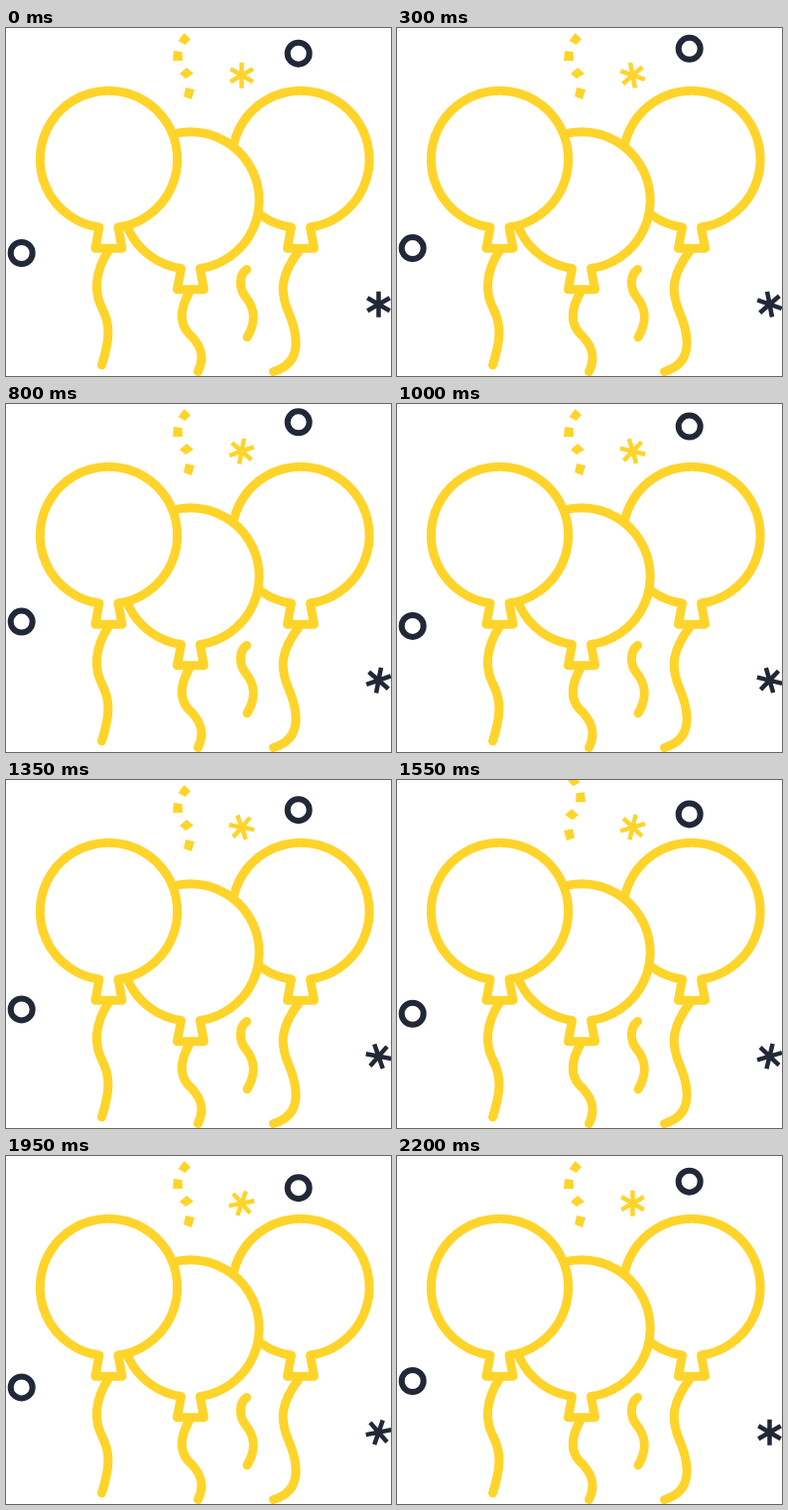
Write an HTML page that moves like this. It is 388 by 351 pixels and loops after 2.25 s.

```html
<!DOCTYPE html>
<html lang="en">
<head>
<meta charset="utf-8">
<title>Party balloons</title>
<style>
  html, body { margin: 0; width: 100%; height: 100%; overflow: hidden; background: #fff; }
  svg { display: block; width: 388px; height: 351px; }
  .yellow { stroke: #ffd42a; }
  .dark { stroke: #222837; }
  .line { fill: none; stroke-width: 9; stroke-linecap: round; stroke-linejoin: round; }
  .balloon { fill: #fff; }
  .ring { fill: none; stroke-width: 6; }
  .star { fill: none; stroke-width: 4.5; }
</style>
</head>
<body>
<svg viewBox="0 0 388 351">
  <defs>
    <path id="balloon" d="M-9.5 68.5A69.2 69.2 0 1 1 9.5 68.5L13.5 89.7H-13.5Z"/>
    <path id="star" d="M0-13V13M-11.26-6.5L11.26 6.5M-11.26 6.5L11.26-6.5"/>
  </defs>

  <g class="line yellow">
    <path d="M103 225C90 245 88 266 97 283C105 299 105 313 96.500 340"/>
    <path d="M185 266C176 282 174 297 184 308C194 317 202 329 193.500 346.500"/>
    <path d="M295 225C277 249 276 265 284 285C294 308 300 338 269.500 346.500"/>
    <path d="M242.500 243.500C235 249 234 262 242 272C251 283 252 297 243 312"/>
    <use class="balloon" href="#balloon" x="297" y="132.500"/>
    <use class="balloon" href="#balloon" x="186" y="174"/>
    <use class="balloon" href="#balloon" x="103.500" y="132.500"/>
  </g>

  <path id="confetti" fill="#ffd42a" d="M179.500 5L186 11L180.500 17L173.500 13ZM169 23L177.500 24L178 33L168 33ZM182 40L189 46L181 51L175 46ZM181 60L190 62L187 72L179 69Z"/>

  <g id="rings" class="ring dark">
    <circle cx="15.700" cy="227" r="11"/>
    <circle cx="294.700" cy="25.700" r="11"/>
  </g>

  <g transform="translate(237.500 47.700)"><use class="star yellow spin" href="#star"/></g>
  <g transform="translate(375.500 278.700)"><use class="star dark spin" href="#star"/></g>
</svg>
<script>
  const LOOP = 2250, STEP = 50, CYCLE = 2200;
  const BOB = [[0, 0], [650, -10.6], [1720, 12.4], [CYCLE, 0]];
  const rings = document.getElementById('rings');
  const confetti = document.getElementById('confetti');
  const stars = document.querySelectorAll('.spin');

  function track(keys, t) {
    const i = Math.max(1, keys.findIndex(([time]) => t <= time));
    const [t0, v0] = keys[i - 1], [t1, v1] = keys[i];
    return v0 + (v1 - v0) * (t - t0) / (t1 - t0);
  }

  function draw(t) {
    rings.setAttribute('transform', `translate(0 ${track(BOB, t)})`);
    stars.forEach(star => star.setAttribute('transform', `rotate(${360 * t / CYCLE})`));

    // The confetti flips to its mirrored pose twice per cycle.
    const phase = t % (CYCLE / 2);
    const flipped = phase >= 400 && phase < 750;
    confetti.setAttribute('transform', flipped ? 'translate(358 -10.7) scale(-1 1)' : '');
  }

  const start = performance.now();
  function tick() {
    const elapsed = (performance.now() - start) % LOOP;
    draw(Math.floor(elapsed / STEP) * STEP);
    requestAnimationFrame(tick);
  }
  draw(0);
  requestAnimationFrame(tick);
</script>
</body>
</html>
```
